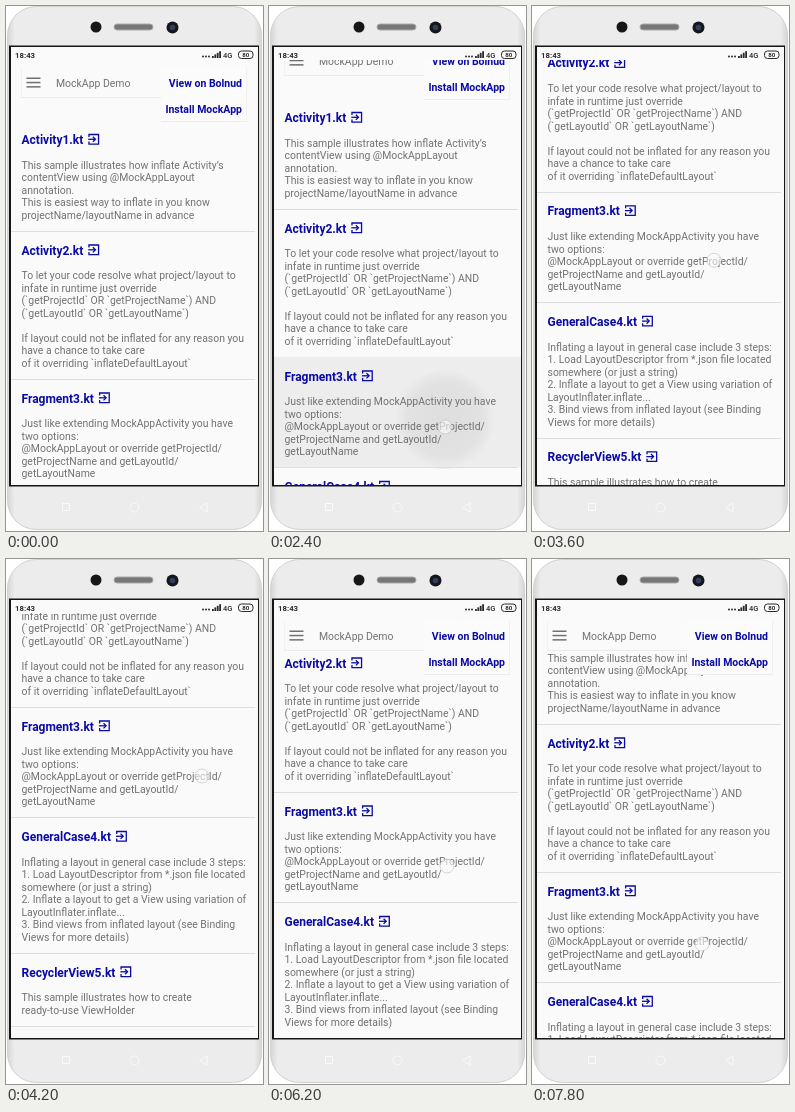
These frames come from a looping animation (257x525 px, 8000 ms). An HTML page with a canvas:

```html
<!DOCTYPE html>
<html lang="en">
<head>
<meta charset="utf-8">
<title>MockApp Demo</title>
<style>
  html, body { margin: 0; width: 100%; height: 100%; overflow: hidden; background: #fff; }
  canvas { display: block; }
</style>
</head>
<body>
<canvas id="stage" width="257" height="525"></canvas>
<script>
const ctx = document.getElementById('stage').getContext('2d');
const LOOP = 8000, STEP = 200;
const PAPER = '#fafafa', LINK = '#0a0aa6', BODY = '#727272', INK = '#2b2b2b';
const FONT = 'Roboto, Arial, sans-serif';
const LINE_HEIGHT = 12.5, VIEW_TOP = 54, VIEW_BOTTOM = 479;

const sections = [
  ['Activity1.kt',
    'This sample illustrates how inflate Activity’s',
    'contentView using @MockAppLayout',
    'annotation.',
    'This is easiest way to inflate in you know',
    'projectName/layoutName in advance'],
  ['Activity2.kt',
    'To let your code resolve what project/layout to',
    'infate in runtime just override',
    '(`getProjectId` OR `getProjectName`) AND',
    '(`getLayoutId` OR `getLayoutName`)',
    '',
    'If layout could not be inflated for any reason you',
    'have a chance to take care',
    'of it overriding `inflateDefaultLayout`'],
  ['Fragment3.kt',
    'Just like extending MockAppActivity you have',
    'two options:',
    '@MockAppLayout or override getProjectId/',
    'getProjectName and getLayoutId/',
    'getLayoutName'],
  ['GeneralCase4.kt',
    'Inflating a layout in general case include 3 steps:',
    '1. Load LayoutDescriptor from *.json file located',
    'somewhere (or just a string)',
    '2. Inflate a layout to get a View using variation of',
    'LayoutInflater.inflate...',
    '3. Bind views from inflated layout (see Binding',
    'Views for more details)'],
  ['RecyclerView5.kt',
    'This sample illustrates how to create',
    'ready-to-use ViewHolder']
];

// Finger drag: time, scroll offset, finger x, finger y
const drag = [
  [2000, 0, 172, 442],
  [2400, 22, 176, 421],
  [3200, 143, 175, 298],
  [4200, 225, 196, 217],
  [5400, 225, 198, 220],
  [6200, 140, 178, 307],
  [7800, 60, 170, 385]
];

// Monotone cubic interpolation of one column of the drag
function track(column, t) {
  const last = drag.length - 1;
  if (t <= drag[0][0]) return drag[0][column];
  if (t >= drag[last][0]) return drag[last][column];
  const secant = i => (drag[i + 1][column] - drag[i][column]) / (drag[i + 1][0] - drag[i][0]);
  const slope = i => {
    if (i === 0 || i === last) return 0;
    const a = secant(i - 1), b = secant(i);
    return a * b > 0 ? 2 * a * b / (a + b) : 0;
  };
  const i = drag.findIndex(key => key[0] > t) - 1;
  const span = drag[i + 1][0] - drag[i][0];
  const u = (t - drag[i][0]) / span, v = 1 - u;
  return drag[i][column] * (1 + 2 * u) * v * v + slope(i) * span * u * v * v
    + drag[i + 1][column] * (3 - 2 * u) * u * u - slope(i + 1) * span * u * u * v;
}

function text(str, x, y, size, color, weight = 400, align = 'left') {
  ctx.font = `${weight} ${size}px ${FONT}`;
  ctx.fillStyle = color;
  ctx.textAlign = align;
  ctx.fillText(str, x, y);
}

function rect(x, y, w, h, color) {
  ctx.fillStyle = color;
  ctx.fillRect(x, y, w, h);
}

function pill(x, y, w, h, r, fill, stroke, width = 1) {
  ctx.beginPath();
  ctx.roundRect(x, y, w, h, r);
  if (fill) { ctx.fillStyle = fill; ctx.fill(); }
  if (stroke) { ctx.strokeStyle = stroke; ctx.lineWidth = width; ctx.stroke(); }
}

function disc(x, y, r, fill, stroke) {
  pill(x - r, y - r, 2 * r, 2 * r, r, fill, stroke);
}

function line(color, width, ...points) {
  ctx.beginPath();
  points.forEach(([x, y]) => ctx.lineTo(x, y));
  ctx.strokeStyle = color;
  ctx.lineWidth = width;
  ctx.stroke();
}

function clipped(top, draw) {
  ctx.save();
  ctx.beginPath();
  ctx.rect(5, top, 247, VIEW_BOTTOM - top);
  ctx.clip();
  draw();
  ctx.restore();
}

function drawPhone() {
  rect(0, 0, 257, 525, '#fff');
  const shell = ctx.createLinearGradient(1, 0, 256, 0);
  shell.addColorStop(0, '#d4d4d4');
  shell.addColorStop(0.03, '#ececec');
  shell.addColorStop(0.97, '#ececec');
  shell.addColorStop(1, '#d4d4d4');
  pill(1.5, 0.5, 254, 523, 29, shell, '#d0d0d0');
  disc(90, 21, 5.5, '#171717');
  pill(108, 18, 39, 6, 3, '#777', '#aaa');
  disc(166.5, 21.5, 6, '#15171c');
  disc(166.5, 21.5, 2.8, '#30405c');
  rect(3, 39.5, 250, 441, '#161616');
  rect(5, 41, 247, 438, PAPER);
  pill(56.5, 497.5, 7, 7, 0, null, '#fafafa');
  disc(128.5, 501.5, 4.5, null, '#fafafa');
  line('#fafafa', 1, [201, 497], [193.5, 501.5], [201, 506], [201, 497]);
}

function drawStatusBar() {
  text('18:43', 9, 52, 7.8, INK, 700);
  for (let i = 0; i < 3; i++) disc(197 + i * 3, 50.5, 1, INK);
  for (let i = 0; i < 4; i++) rect(206 + i * 2.4, 50 - i * 1.6, 1.8, 2 + i * 1.6, INK);
  text('4G', 217, 52, 7.5, INK, 500);
  pill(232.5, 45, 14.5, 7.5, 3, null, INK);
  text('80', 239.7, 51.2, 6.2, INK, 700, 'center');
}

function drawEnterIcon(x, y) {
  line(LINK, 1.3, [x + 0.7, y - 2.5], [x + 0.7, y - 5], [x + 10.3, y - 5],
    [x + 10.3, y + 4.6], [x + 0.7, y + 4.6], [x + 0.7, y + 2]);
  line(LINK, 1.3, [x, y - 0.2], [x + 7, y - 0.2]);
  line(LINK, 1.3, [x + 4.6, y - 2.8], [x + 7.2, y - 0.2], [x + 4.6, y + 2.4]);
}

function drawRipple(top, bottom, t) {
  const strength = { 2200: 0.5, 2400: 1, 2600: 0.4 }[t];
  if (!strength) return;
  ctx.save();
  ctx.globalAlpha = strength;
  rect(5, top, 247, bottom - top, '#ededed');
  const x = 176, y = track(3, t) - 8;
  const glow = ctx.createRadialGradient(x, y, 0, x, y, 50);
  glow.addColorStop(0, '#dedede');
  glow.addColorStop(0.75, '#e2e2e2');
  glow.addColorStop(1, '#ededed');
  disc(x, y, 50, glow);
  ctx.restore();
}

function drawList(scroll, t) {
  let y = 134 - scroll;
  sections.forEach(([title, ...lines], index) => {
    const bottom = y + 25 + (lines.length - 1) * LINE_HEIGHT + 15.8;
    if (index === 2) drawRipple(y - 19.7, bottom, t);
    text(title, 15.5, y + 4, 12, LINK, 700);
    drawEnterIcon(20.5 + ctx.measureText(title).width, y - 0.5);
    lines.forEach((str, i) => text(str, 15.5, y + 28.7 + i * LINE_HEIGHT, 10.45, BODY));
    rect(5, Math.round(bottom), 244, 1, '#dedede');
    y = bottom + 19.7;
  });
}

function drawToolbar(offset) {
  ctx.save();
  ctx.translate(0, offset);
  rect(5, 41, 247, 51, PAPER);
  rect(15, 91, 140, 1, '#ececec');
  rect(15, 62, 1, 29, '#f1f1f1');
  rect(155, 62, 86, 53, '#fbfbfb');
  rect(155, 115, 86, 1, '#ececec');
  rect(240, 62, 1, 53, '#efefef');
  for (let i = 0; i < 3; i++) rect(20.5, 71.5 + i * 4.3, 14, 1.5, '#707070');
  text('MockApp Demo', 50, 80.7, 10.45, BODY);
  text('View on Bolnud', 236, 80.7, 10.5, LINK, 700, 'right');
  text('Install MockApp', 236, 107, 10.5, LINK, 700, 'right');
  ctx.restore();
}

function render(t) {
  const scroll = track(1, t);
  const returning = t > 4800;
  const offset = returning ? Math.min(0, 169 - scroll) : -Math.min(scroll, 62);
  const ghost = returning && offset < -40;

  drawPhone();
  clipped(VIEW_TOP, () => {
    drawList(scroll, t);
    if (!ghost) drawToolbar(offset);
  });
  if (ghost && t >= 5400) {
    clipped(41, () => {
      ctx.globalAlpha = 0.2;
      text('Install MockApp', 236, 107 + offset, 10.5, LINK, 700, 'right');
    });
  }
  drawStatusBar();
  if (t >= 2000) {
    disc(track(2, t), track(3, t), 7, 'rgba(250,250,250,.6)', 'rgba(190,190,190,.6)');
  }
}

const start = performance.now();
function tick() {
  const elapsed = (performance.now() - start) % LOOP;
  render(Math.floor(elapsed / STEP) * STEP);
  requestAnimationFrame(tick);
}
tick();
</script>
</body>
</html>
```
